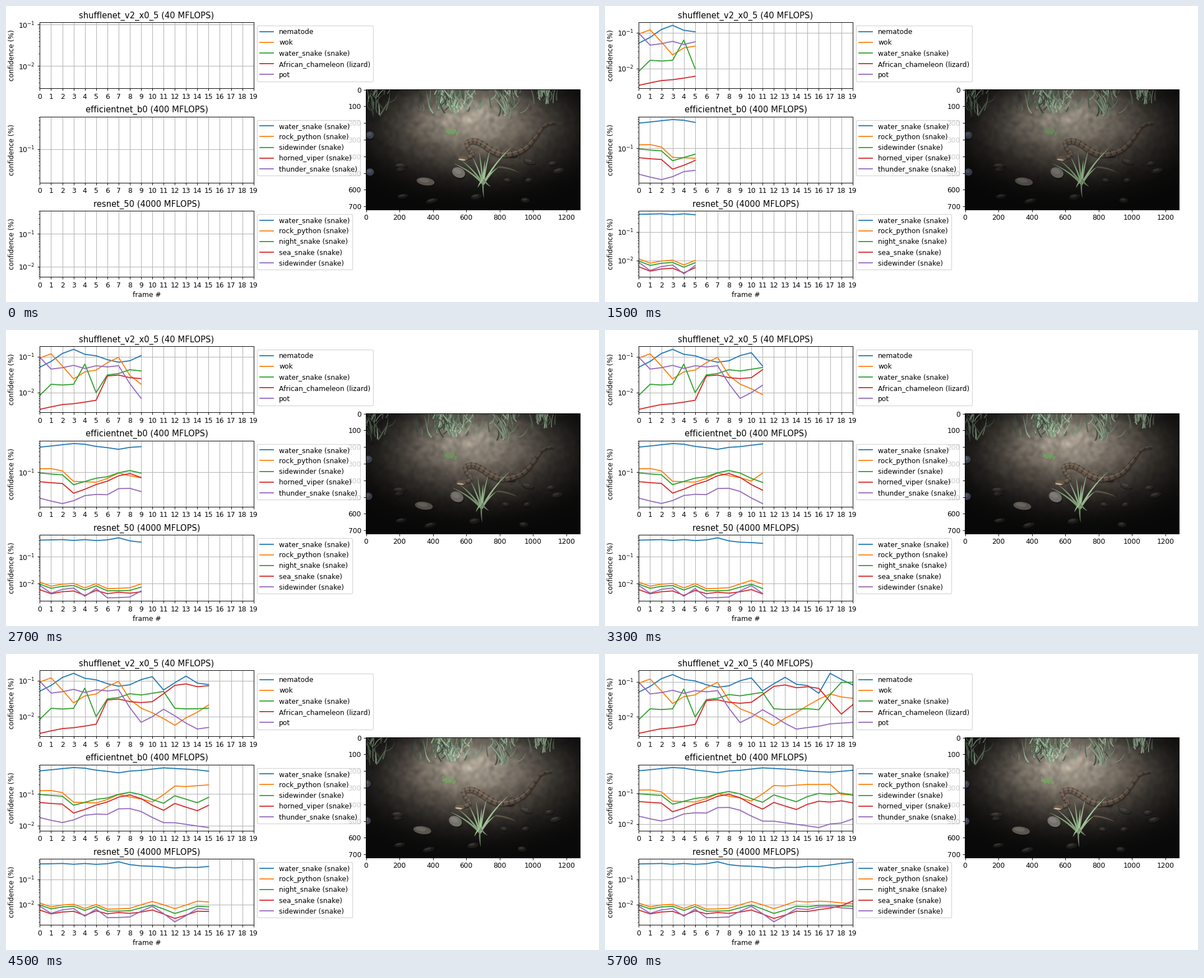
Recreate the animation shown at these times as a matplotlib script. Size 1058 px wide and 529 px high, loop 6 s.

```python
import numpy as np
import matplotlib.pyplot as plt
from matplotlib.animation import FuncAnimation
from matplotlib.collections import LineCollection, PolyCollection
from matplotlib.patches import Ellipse, Rectangle
from matplotlib.transforms import Affine2D

W, H, STEPS = 1058, 529, 20
fig = plt.figure(figsize=(12, 6), dpi=W / 12, facecolor="white")
rng = np.random.default_rng(4)
steps = np.arange(STEPS)


def add_axes(left, top, width, height):
    return fig.add_axes([left / W, 1 - (top + height) / H, width / W, height / H])


def hump(center, width):
    return np.exp(-((steps - center) / width) ** 2)


def trend(*points, wobble=0.03):
    """Log-linear path through (step, thousandths) with a slight wobble in between."""
    at, value = np.array(points, float).T
    path = np.interp(steps, at, np.log10(value / 1000))
    free = ~np.isin(steps, at)
    return 10 ** (path + wobble * free * rng.normal(size=STEPS))


def shufflenet():
    return [
        trend((0, 51), (3, 160), (7, 70), (10, 129), (11, 55), (13, 134), (16, 47), (17, 174), (19, 82)),
        trend((0, 92), (1, 120), (3, 24), (7, 96), (8, 30), (12, 5.7), (17, 45), (19, 34)),
        trend((0, 8.4), (1, 17), (3, 17), (4, 62), (5, 10), (6, 31), (11, 50), (12, 17), (16, 16), (18, 96)),
        trend((0, 3.4), (5, 6.1), (6, 29), (10, 26), (12, 74), (16, 65), (18, 12), (19, 22)),
        trend((0, 96), (1, 45), (7, 56), (9, 6.9), (11, 16), (14, 4.5), (19, 7)),
    ]


def efficientnet():
    sidewinder = trend((0, 96), (2, 85), (3, 44), (8, 113), (11, 51), (12, 88), (14, 53), (16, 98))
    return [
        trend((0, 533), (3, 675), (7, 461), (11, 660), (17, 480), (19, 550), wobble=0.01),
        trend((0, 126), (2, 110), (3, 55), (5, 52), (7, 96), (10, 56), (12, 177), (17, 195), (18, 91)),
        sidewinder,
        sidewinder * (0.56 + 0.27 * hump(7.5, 2.5)),
        trend((0, 18), (2, 12.6), (7, 34), (9, 28), (11, 12.5), (16, 7.7), (19, 14.6)),
    ]


def resnet():
    night = trend((0, 9.5), (1, 6.7), (3, 8.5), (4, 5.8), (5, 8.3), (6, 5.4), (8, 5.6),
                  (10, 9.5), (12, 4.4), (14, 8.5))
    return [
        trend((0, 410), (6, 418), (7, 500), (8, 385), (12, 283), (16, 325), (19, 486), wobble=0.01),
        night * (1.2 + 0.4 * hump(13.5, 4)),
        night,
        night * (0.63 + 0.25 * hump(7, 1.5) + np.exp(steps - 19.0)),
        0.0069 * (night / 0.0085) ** 1.85,
    ]


PANELS = [
    ("shufflenet_v2_x0_5 (40 MFLOPS)", shufflenet(),
     ["nematode", "wok", "water_snake (snake)", "African_chameleon (lizard)", "pot"]),
    ("efficientnet_b0 (400 MFLOPS)", efficientnet(),
     ["water_snake (snake)", "rock_python (snake)", "sidewinder (snake)",
      "horned_viper (snake)", "thunder_snake (snake)"]),
    ("resnet_50 (4000 MFLOPS)", resnet(),
     ["water_snake (snake)", "rock_python (snake)", "night_snake (snake)",
      "sea_snake (snake)", "sidewinder (snake)"]),
]

# Photo panel; its shapes use stage pixels measured from the panel corner
PW, PH = 381.2, 214.4
photo = add_axes(642.4, 149.5, PW, PH)
drift = Affine2D()
to_photo = drift + Affine2D().scale(1280 / PW) + photo.transData


def light(u, v):
    return np.exp(-(((u - 195) / 170) ** 2 + ((v - 70) / 90) ** 2) ** 1.5)


def ground():
    u, v = np.meshgrid(np.linspace(0, PW, 80), np.linspace(0, PH, 45))
    spot = np.exp(-((u - 185) / 100) ** 2 - ((v - 48) / 55) ** 2)
    grain = 1 + 0.12 * rng.standard_normal(u.shape)
    rgb = 9 + (light(u, v) * 74 * grain)[..., None] * [1, 0.9, 0.79]
    rgb = rgb + (spot * 85 * grain)[..., None] * [1, 0.98, 0.91]
    return np.clip(rgb / 255, 0, 1)


def blade(x0, y0, x1, y1, bend, width):
    t = np.linspace(0, 1, 9)
    p = np.outer(1 - t, [x0, y0]) + np.outer(t, [x1, y1])
    n = np.array([y0 - y1, x1 - x0]) / (np.hypot(x1 - x0, y1 - y0) + 1e-6)
    p = p + np.outer(bend * 4 * t * (1 - t), n)
    side = np.outer(width / 2 * (1 - t ** 2) + 0.15, n)
    return np.vstack([p + side, (p - side)[::-1]])


def add_blades(shapes, colors, z):
    photo.add_collection(PolyCollection(shapes, facecolors=np.clip(colors, 0, 1), linewidths=0,
                                        transform=to_photo, zorder=z), autolim=False)


def add_ellipse(x, y, w, h, color, angle=0, alpha=1.0, z=2):
    patch = Ellipse((x, y), w, h, angle=angle, color=color, alpha=alpha, lw=0, zorder=z)
    patch.set_transform(to_photo)
    photo.add_artist(patch)
    patch.set_clip_path(photo.patch)


def stone(x, y, w, h, angle, color):
    add_ellipse(x + 1, y + 2, w, h, "#0d0c0b", angle, 0.5)
    add_ellipse(x, y, w, h, color, angle, 0.85)
    add_ellipse(x - w * 0.08, y - h * 0.15, w * 0.6, h * 0.5, "white", angle, 0.1)


def stones():
    for _ in range(14):
        x, y = rng.uniform(20, 360), rng.uniform(110, 200)
        shade = 0.12 + 0.16 * light(x, y)
        stone(x, y, rng.uniform(12, 24), rng.uniform(7, 11), rng.uniform(-15, 15),
              (shade, shade * 0.93, shade * 0.86))
    for y in (81, 147):
        stone(7, y, 14, 13, 0, "#454b5c")
    stone(165, 148, 24, 18, 25, "#85817c")
    stone(106, 164, 32, 14, 8, "#68625b")


def meadow():
    shapes, colors = [], []
    # centre, spread, lowest root, count
    for cx, spread, low, count in [(18, 16, 50, 24), (148, 36, 44, 95), (254, 18, 54, 36), (322, 17, 26, 24)]:
        for _ in range(count):
            x, y = cx + spread * rng.normal(0, 0.65), low * rng.uniform(0.1, 1)
            dx, dy = rng.normal(0, 11), -rng.uniform(14, 36)
            shapes.append(blade(x, y, x + dx, y + dy, rng.normal(0, 3), rng.uniform(1, 2.8)))
            tone = rng.uniform(0.35, 1) * (0.62 + 0.38 * light(x, y))
            colors.append(np.array([0.74, 0.87, 0.73]) * tone)
    add_blades(shapes, colors, 4)


def clump():
    tips = [(157, 132), (171, 127), (190, 121), (202, 113), (221, 108), (258, 104), (212, 126), (236, 138)]
    shapes = [blade(209, 169, x, y, (205 - x) / 14, 3) for x, y in tips]
    shapes += [blade(209, 160, x, y, 1, 2.8) for x, y in [(210, 193), (199, 175), (222, 173)]]
    tones = rng.uniform(0.75, 1.05, len(shapes))
    add_blades(shapes, np.outer(tones, [0.62, 0.75, 0.58]), 6)
    add_blades([blade(236, 138, 273, 148, -2, 3)], [[0.36, 0.34, 0.28]], 6)
    # low sprig on the open mud
    sprig = [blade(x, y, x + rng.normal(0, 4), y - rng.uniform(1, 5), 1, 2.6)
             for x, y in zip(rng.normal(154, 8, 26), rng.normal(76, 2.5, 26))]
    add_blades(sprig, [[0.47, 0.64, 0.4]] * len(sprig), 4)


def smooth(points, n=12):
    p = np.array(points, float)
    p = np.vstack([2 * p[0] - p[1], p, 2 * p[-1] - p[-2]])
    t = np.linspace(0, 1, n, endpoint=False)[:, None]
    parts = [0.5 * (2 * b + (c - a) * t + (2 * a - 5 * b + 4 * c - d) * t ** 2
                    + (3 * b - a - 3 * c + d) * t ** 3)
             for a, b, c, d in zip(p, p[1:], p[2:], p[3:])]
    return np.vstack(parts + [p[-2:-1]])


def snake():
    body = smooth([(337, 59), (318, 64), (301, 86), (284, 104), (264, 113), (243, 115), (225, 108),
                   (208, 97), (193, 91), (179, 95), (184, 107), (191, 116), (174, 123)])
    s = np.linspace(0, 1, len(body) - 1)
    width = np.interp(s, [0, 0.2, 0.45, 0.65, 0.85, 1], [2.5, 7, 11, 10, 7, 5]) * 0.8
    band = np.sin(np.arange(len(s)) * 2 * np.pi / 6) > 0.2
    skin = np.where(band[:, None], [0.31, 0.255, 0.225], [0.43, 0.375, 0.325])
    skin = skin * np.interp(s, [0, 0.3, 0.5, 1], [0.62, 0.85, 1, 1])[:, None]

    def strip(dx, dy, scale, colors, alpha):
        p = body + [dx, dy]
        photo.add_collection(LineCollection(np.stack([p[:-1], p[1:]], 1), linewidths=width * scale,
                                            colors=colors, alpha=alpha, transform=to_photo,
                                            capstyle="butt", zorder=5), autolim=False)

    strip(1, 2.5, 1.1, "#16120f", 0.4)
    strip(0, 0, 1.0, skin, 1)
    strip(0, -1.5, 0.25, "#a2907c", 0.4)
    add_ellipse(173, 122.5, 17, 8, "#6f5b4b", 8, z=5)
    add_ellipse(171, 125, 13, 3, "#c9b9a2", 8, z=5)


photo.imshow(ground(), extent=(-0.5, 1279.5, 719.5, -0.5), interpolation="bicubic", aspect="auto")
stones()
meadow()
snake()
clump()
veil = photo.add_patch(Rectangle((-0.5, -0.5), 1280, 720, color="black", lw=0, alpha=0, zorder=8))
photo.set(xlim=(-0.5, 1279.5), ylim=(719.5, -0.5),
          xticks=range(0, 1201, 200), yticks=range(0, 701, 100))
for spine in photo.spines.values():
    spine.set_zorder(9)

charts = []
for i, (title, rows, names) in enumerate(PANELS):
    ax = add_axes(60.4, 29.2 + 168.4 * i, 381.3, 118)
    ax.set_yscale("log")
    lines = [ax.plot([], [], label=name)[0] for name in names]
    ax.set(title=title, ylabel="confidence (%)", xlim=(0, STEPS - 1), xticks=steps)
    ax.grid()
    ax.legend(loc="upper left", bbox_to_anchor=(1, 1))
    charts.append((ax, lines, np.array(rows)))
charts[-1][0].set_xlabel("frame #")


def update(k):
    for ax, lines, data in charts:
        seen = data[:, :k + 1]
        for line, row in zip(lines, seen):
            line.set_data(steps[:k + 1], row)
        lo, hi = np.log10(seen.min()), np.log10(seen.max())
        pad = 0.05 * (hi - lo)
        ax.set_ylim(10 ** (lo - pad), 10 ** (hi + pad))
    t = k / (STEPS - 1)
    drift.clear().translate(-6.5 * t * t * (3 - 2 * t), 2 * t * t)
    # the lamp dims early on and recovers
    veil.set_alpha(0.16 * np.exp(-((k - 6) / 4) ** 2))
    return []


anim = FuncAnimation(fig, update, frames=STEPS, interval=300, repeat=True, repeat_delay=0)
plt.show()
```
